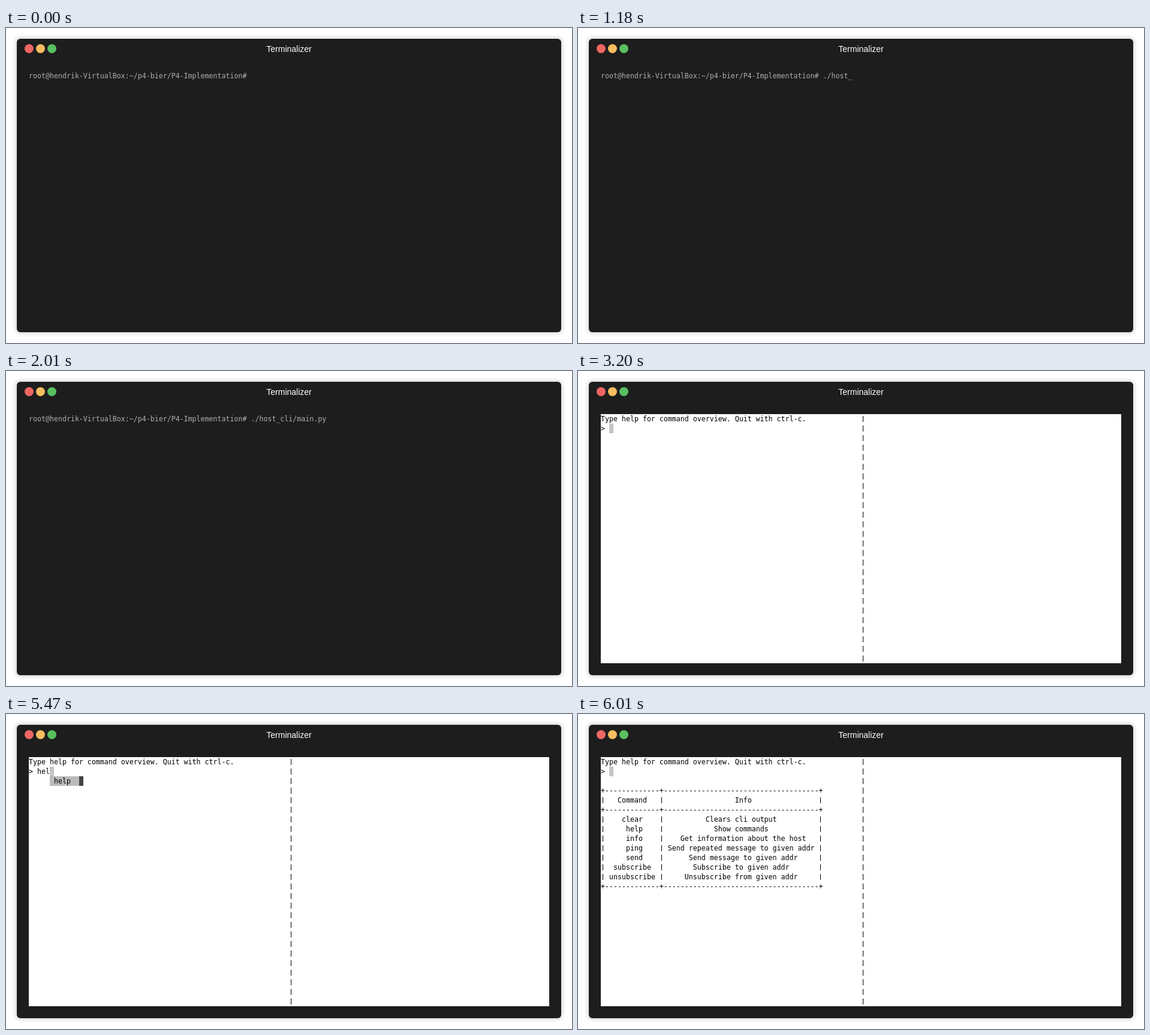
An HTML page that plays this animation: 944x526 px, repeating every 8 s.

```html
<!DOCTYPE html>
<html lang="en">
<head>
<meta charset="utf-8">
<title>Terminal</title>
<style>
  html, body { margin: 0; width: 100%; height: 100%; overflow: hidden; background: #fff; }
  #window {
    position: absolute; left: 18px; top: 18px; width: 908px; height: 490px;
    border-radius: 6px; background: #1d1d1d;
    box-shadow: 0 0 4px 4px rgba(0, 0, 0, .1);
  }
  .dot { position: absolute; top: 9px; width: 15px; height: 15px; border-radius: 50%; }
  #title {
    position: absolute; left: 0; right: 0; top: 9px; text-align: center;
    font: 14px/16px "Liberation Sans", Arial, sans-serif; color: #fff;
  }
  #screen { position: absolute; left: 20px; top: 54px; width: 868px; height: 416px; color: #afafaf; }
  #screen.app { background: #fff; color: #000; }
  #screen pre, #screen span { font: 11.627px/16px "DejaVu Sans Mono", monospace; }
  #screen pre { position: absolute; margin: 0; white-space: pre; }
  #cursor, #menu, #bar { position: absolute; height: 16px; }
  #cursor { top: 16px; width: 7px; background: #c4c4c4; }
  #menu { top: 32px; width: 49px; background: #bbb; }
  #bar { left: 49px; width: 7px; background: #444; }
  #split { left: 434px; top: 0; }
  .pipe { position: relative; color: transparent; }
  .pipe::after {
    content: ""; position: absolute; left: 3px; top: 2px;
    width: 1px; height: 10px; background: #000;
  }
  #screen:not(.app) > :not(#text), .off { display: none; }
</style>
</head>
<body>
<div id="window">
  <div class="dot" style="left:13px;background:#ee6763"></div>
  <div class="dot" style="left:32px;background:#f7bd60"></div>
  <div class="dot" style="left:51px;background:#58c060"></div>
  <div id="title">Terminalizer</div>
  <div id="screen">
    <div id="cursor"></div>
    <div id="menu"><pre> help  </pre><div id="bar"></div></div>
    <pre id="text"></pre>
    <pre id="split"></pre>
  </div>
</div>
<script>
const LOOP = 8000, CELL = 7;
const $ = id => document.getElementById(id);
const prompt = 'root@hendrik-VirtualBox:~/p4-bier/P4-Implementation# ';
const intro = 'Type help for command overview. Quit with ctrl-c.\n> ';
const commands = [
  ['clear', 'Clears cli output'],
  ['help', 'Show commands'],
  ['info', 'Get information about the host'],
  ['ping', 'Send repeated message to given addr'],
  ['send', 'Send message to given addr'],
  ['subscribe', 'Subscribe to given addr'],
  ['unsubscribe', 'Unsubscribe from given addr']
];

function center(s, width) {
  const left = Math.ceil((width - s.length) / 2);
  return (' '.repeat(left) + s).padEnd(width);
}
const row = ([name, info]) => `| ${center(name, 11)} | ${center(info, 35)} |`;
const rule = `+${'-'.repeat(13)}+${'-'.repeat(37)}+`;
const table = [rule, row(['Command', 'Info']), rule, ...commands.map(row), rule].join('\n');
const pipes = s => s.replace(/\|/g, '<span class="pipe">|</span>');

const shell = (at, typed) => ({ at, typed });
const app = (at, typed, menu = false, output = '') => ({ at, typed, menu, output, app: true });
const states = [
  shell(0, ''),
  shell(500, '.'),
  shell(780, './'),
  shell(950, './h'),
  shell(1040, './ho'),
  shell(1180, './host_'),
  shell(1440, './host_c'),
  shell(1540, './host_cli/'),
  shell(1680, './host_cli/m'),
  shell(1800, './host_cli/ma'),
  shell(2010, './host_cli/main.py'),
  app(3200, ''),
  app(5070, 'h', true),
  app(5280, 'he', true),
  app(5470, 'hel', true),
  app(5720, 'help', true),
  app(5820, 'help'),
  app(6010, '', false, '\n\n' + table)
];

function show(s) {
  $('screen').classList.toggle('app', !!s.app);
  if (!s.app) {
    $('text').textContent = prompt + s.typed;
    return;
  }
  const x = (2 + s.typed.length) * CELL + 'px';
  $('text').innerHTML = intro.replace('>', '&gt;') + s.typed + pipes(s.output);
  $('cursor').style.left = $('menu').style.left = x;
  $('menu').classList.toggle('off', !s.menu);
}

$('split').innerHTML = pipes(Array(26).fill('|').join('\n'));
const start = performance.now();
let current;
function tick() {
  const t = (performance.now() - start) % LOOP;
  const next = states.filter(s => s.at <= t).pop();
  if (next !== current) show(current = next);
  requestAnimationFrame(tick);
}
tick();
</script>
</body>
</html>
```
